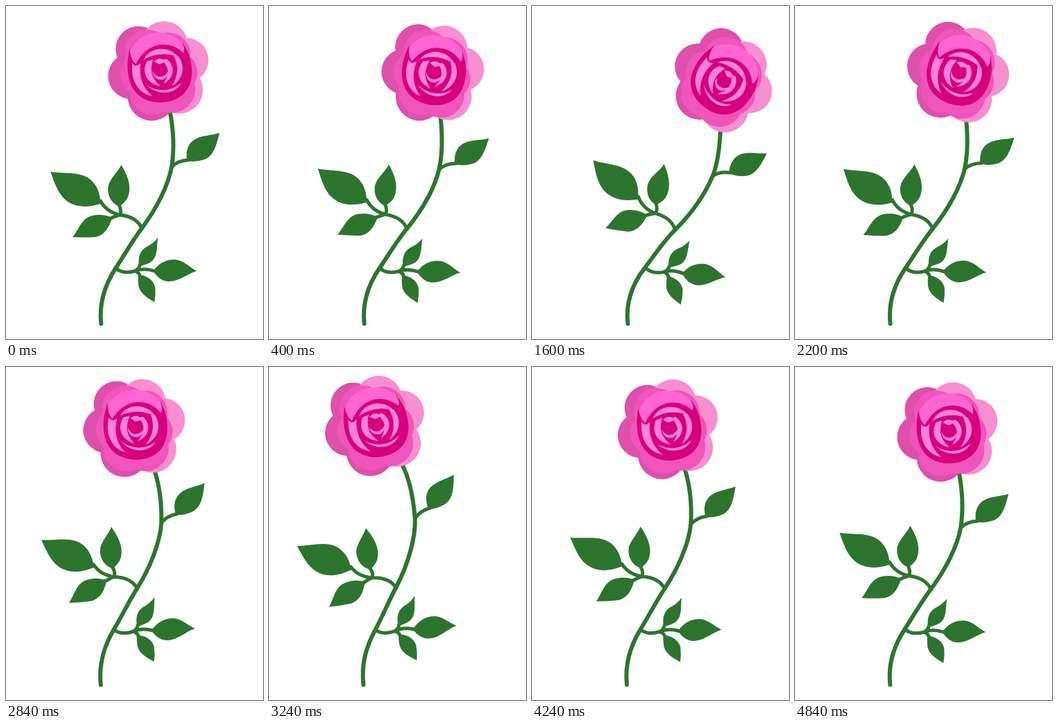
These frames come from a looping animation (371x480 px, 5.12 s). An HTML page:

```html
<!DOCTYPE html>
<html lang="en">
<head>
<meta charset="utf-8">
<title>Swaying rose</title>
<style>
  html, body { margin: 0; height: 100%; overflow: hidden; background: #fff; }
  svg { display: block; width: 100vw; height: 100vh; }
  .twig { fill: none; stroke: #2d752f; stroke-width: 5; stroke-linecap: round; }
  .leaf { fill: #2d752f; }
</style>
</head>
<body>
<svg viewBox="0.7 0 371 480">
  <path id="stem" class="twig" style="stroke-width:6"/>
  <g id="low">
    <path class="twig" d="M159 378Q170 387 187 382Q200 377 215 382M187 382Q193 379 194 373M187 382Q194 385 194 390"/>
    <path class="leaf" d="M220 334C218 348 220 362 210 369Q203 373 193 375C191 364 193 354 202 348Q213 343 220 334Z
      M276 382C262 386 250 398 234 397Q222 396 213 382C222 370 234 364 248 366C260 369 266 377 276 382Z
      M215 427C206 421 194 415 192 403Q191 394 192 387C204 389 213 394 216 405Q217 416 215 427Z"/>
  </g>
  <g id="mid">
    <path class="twig" d="M197 321Q190 304 165 301Q146 297 137 281M165 301Q168 295 164 287M165 301Q158 303 152 306"/>
    <path class="leaf" d="M65 239C90 243 118 235 132 262Q137 272 137 285C118 291 100 291 86 279C75 269 70 253 65 239Z
      M167 229C177 245 183 262 176 277Q172 284 164 289C152 284 147 273 148 261C150 249 162 240 167 229Z
      M97 333C106 322 110 305 126 302Q140 299 154 305C150 318 144 330 130 333Q114 334 97 333Z"/>
  </g>
  <g id="high">
    <path class="twig" d="M240 232Q248 223 264 222"/>
    <path class="leaf" d="M309 183C305 197 302 215 288 221Q274 226 262 223C260 211 262 200 272 193C283 186 296 187 309 183Z"/>
  </g>
  <g id="flower">
    <g fill="#de50ac">
      <circle cx="211" cy="131" r="34.5"/>
      <circle cx="181" cy="101" r="33"/>
      <circle cx="192" cy="62" r="33"/>
    </g>
    <g fill="#f78fd2">
      <circle cx="229" cy="56" r="34"/>
      <circle cx="261" cy="78" r="32"/>
      <circle cx="251" cy="121" r="34"/>
    </g>
    <g fill="#ef55bb">
      <circle cx="205" cy="67" r="33"/>
      <circle cx="234" cy="71" r="33"/>
      <circle cx="246" cy="96" r="31"/>
      <circle cx="240" cy="120" r="34"/>
      <circle cx="213" cy="123" r="34"/>
      <circle cx="198" cy="98" r="32"/>
    </g>
    <path fill="#ff66d4" d="M178 74C184 34 240 24 262 62V80L190 90Z"/>
    <path fill="#d6007f" d="M179 62C170 102 182 138 222 139C252 139 269 121 269 96Q269 70 254 51Q260 62 257 68C240 50 206 48 188 84Q181 78 179 62Z"/>
    <g fill="#ff80dc">
      <path d="M183 82C180 108 192 126 212 130C198 118 192 102 195 82Q188 90 183 82Z"/>
      <path d="M199 78C208 58 236 56 250 74C234 67 214 68 199 78Z"/>
      <path d="M249 72C260 86 258 104 240 116C250 100 250 86 243 72Z"/>
      <path d="M204 114C218 124 240 124 254 110C246 128 220 130 204 114Z"/>
      <path d="M204 80C196 96 204 112 224 116C213 106 207 96 213 77Z"/>
      <path d="M232 76C246 86 244 104 228 112C236 100 238 90 226 78Z"/>
      <path d="M212 94Q214 108 228 106Q236 100 235 94Q230 102 223 102Q216 102 212 94Z"/>
      <path d="M214 80Q222 72 232 80L222 84Z"/>
    </g>
  </g>
</svg>
<script>
const LOOP = 5120, MOVE = 4840, STEP = 40, PEAK = 1560, TROUGH = 3220;
const el = id => document.getElementById(id);

// Each joint: rest position, drift per unit of sway (linear, squared), turn in degrees
const joints = {
  base:   { x: 138, y: 458, dx: 1,  dy: 0,    qx: 0,  qy: 0, turn: 0 },
  low:    { x: 159, y: 378, dx: 5,  dy: -1,   qx: 0,  qy: 0, turn: 5 },
  mid:    { x: 197, y: 320, dx: 12, dy: 2.5,  qx: -1, qy: 0, turn: 9 },
  high:   { x: 240, y: 231, dx: 26, dy: 13.5, qx: -3, qy: 0, turn: 13.4 },
  top:    { x: 237, y: 150, dx: 42, dy: 10,   qx: -3, qy: 0, turn: 17 },
  flower: { x: 221, y: 94,  dx: 62, dy: 12,   qx: -6, qy: 3, turn: 17 }
};

const pose = (j, u) => ({
  x: j.x + j.dx * u + j.qx * u * u,
  y: j.y + j.dy * u + j.qy * u * u,
  a: j.turn * u
});

function handle(p, dx, dy) {
  const r = p.a * Math.PI / 180, c = Math.cos(r), s = Math.sin(r);
  return `${p.x + dx * c - dy * s} ${p.y + dx * s + dy * c} `;
}

function sway(t) {
  if (t < PEAK) return t / PEAK;
  if (t < TROUGH) return 1 - 2 * (t - PEAK) / (TROUGH - PEAK);
  return (t - MOVE) / (MOVE - TROUGH);
}

// The bloom also twists on its stalk: quick out, slow back
const twist = t => 28 * Math.min(t / 1210, (MOVE - t) / 3630);

function place(id, u, extra = 0) {
  const j = joints[id], p = pose(j, u);
  el(id).setAttribute('transform',
    `translate(${p.x} ${p.y}) rotate(${p.a + extra}) translate(${-j.x} ${-j.y})`);
}

function draw(now) {
  const t = Math.min(Math.floor(now % LOOP / STEP) * STEP, MOVE);
  const u = sway(t);
  const [base, low, mid, high, top] =
    ['base', 'low', 'mid', 'high', 'top'].map(id => pose(joints[id], u));
  el('stem').setAttribute('d', 'M' + handle(base, 0, 0) +
    'C' + handle(base, -3, -28) + handle(low, -17, 26) + handle(low, 0, 0) +
    'C' + handle(low, 12, -18) + handle(mid, -15, 20) + handle(mid, 0, 0) +
    'C' + handle(mid, 21, -28) + handle(high, -5, 28) + handle(high, 0, 0) +
    'C' + handle(high, 4, -27) + handle(top, 5, 25) + handle(top, 0, 0));
  ['low', 'mid', 'high'].forEach(id => place(id, u));
  place('flower', u, twist(t));
}

const start = performance.now();
(function frame() {
  draw(performance.now() - start);
  requestAnimationFrame(frame);
})();
</script>
</body>
</html>
```
